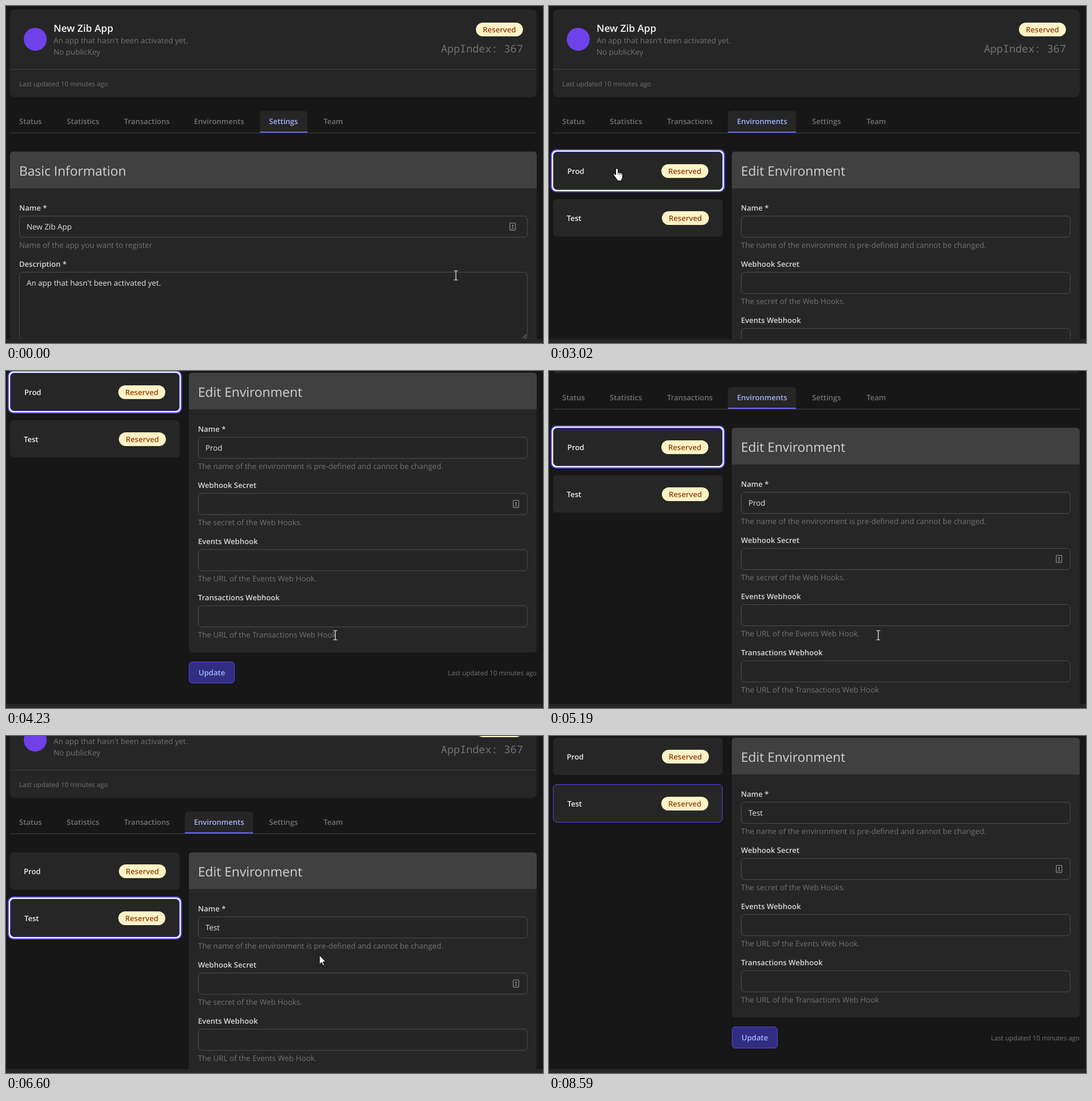
Recreate the animation shown at these times as an HTML page. Size 937x588 px, loop 8.69 s.

```html
<!DOCTYPE html>
<html lang="en">
<head>
<meta charset="utf-8">
<title>App environments</title>
<style>
  html, body { margin: 0; width: 100%; height: 100%; overflow: hidden; background: #171717; }
  svg { display: block; width: 937px; height: 588px; }
  text { font: 13.37px "Open Sans", "Noto Sans", sans-serif; fill: #737373; white-space: pre; text-rendering: geometricPrecision; }
  .semi { font-size: 13.05px; font-weight: 600; }
  .small { font-size: 11.46px; }
  .name { font-size: 17.2px; font-weight: 600; fill: #f5f5f5; }
  .title { font-size: 22.7px; fill: #d4d4d4; }
  .label { fill: #d9d9d9; }
  .value { fill: #e5e5e5; }
  .bright { fill: #f0f0f0; }
  .mono { font: 18.33px "Noto Sans Mono", "DejaVu Sans Mono", monospace; }
  .badge { fill: #92400e; text-anchor: middle; }
  .indigo { fill: #a5b4fc; }
  .end { text-anchor: end; }
</style>
</head>
<body>
<svg id="stage" viewBox="0 0 937 588"></svg>
<script>
const LOOP = 8690;
const stage = document.getElementById('stage');

// Tracks: [start time, value...]
const SCROLL = [
  [0, 0], [3680, 90], [3810, 224], [3960, 251],
  [5040, 175], [5190, 155], [5310, 58], [5460, 53], [5580, 51],
  [6750, 154], [6870, 251]
];
const POINTER = [
  [0, 785, 470, 'beam'], [620, 765, 440, 'arrow'], [740, 650, 350, 'arrow'], [860, 561, 288, 'arrow'],
  [1010, 500, 262, 'arrow'], [1130, 425, 225, 'arrow'], [1250, 378, 200, 'hand'], [1400, 376.5, 199.5, 'hand'],
  [2200, 368, 248, 'arrow'], [2350, 272, 286, 'hand'], [2500, 160, 291, 'hand'], [2650, 118.500, 283.500, 'hand'],
  [3140, 270, 312, 'hand'], [3260, 424, 344, 'arrow'], [3410, 520, 420, 'arrow'], [3530, 572, 460, 'arrow'],
  [4230, 574.5, 461, 'beam'], [5310, 480, 411, 'beam'], [5460, 384.5, 363, 'beam'],
  [5580, 310, 346, 'arrow'], [5700, 210, 330, 'hand'], [5820, 135, 318, 'hand'], [5940, 105, 313, 'hand'],
  [6240, 160, 319, 'hand'], [6360, 320, 347, 'arrow'], [6480, 460, 370, 'arrow'], [6600, 546.5, 382, 'arrow'],
  [7860, 640, 425, 'beam'], [7980, 726, 455, 'arrow'], [8100, 822, 472, 'arrow'], [8220, 921, 569, 'arrow'],
  [8340, 0, 0, 'none']
];
const STEPS = [...new Set([...SCROLL, ...POINTER].map(k => k[0])
  .concat(1800, 2900, 6090, 4100, 8590))].sort((a, b) => a - b);

const TABS = [
  ['Status', 23, 55], ['Statistics', 106, 72], ['Transactions', 206, 95],
  ['Environments', 328, 103], ['Settings', 459, 67], ['Team', 554, 50]
];
const FIELDS = [
  ['Name *', 'The name of the environment is pre-defined and cannot be changed.'],
  ['Webhook Secret', 'The secret of the Web Hooks.'],
  ['Events Webhook', 'The URL of the Events Web Hook.'],
  ['Transactions Webhook', 'The URL of the Transactions Web Hook']
];
const APP = 'New Zib App';
const ABOUT = "An app that hasn't been activated yet.";
const UPDATED = 'Last updated 10 minutes ago';

const CURSORS = {
  none: '',
  arrow: `<path d="M.5 .5V16.500L4.200 13 6.600 18.500 9 17.400 6.600 12H11.500Z" fill="#fff" stroke="#000"/>`,
  beam: `<path d="M-3.500-8H-.8L0-7.300 .8-8H3.500M0-7.500V7.500M-3.500 8H-.8L0 7.300 .8 8H3.500" fill="none" stroke="#eee" stroke-width="1.200"/>`,
  hand: `<path d="M-2 2a2 2 0 0 1 4 0v5.500q1.800-1.200 3 .4 1.800-.9 2.800 .6 2.200-.4 2.200 1.800v4.200q0 2.500-1.800 4.500v2.500h-7.700v-1.700q-2-2-3.600-5-1.700-2.300-2.800-3.600c-.7-1.600 1-2.600 2.200-1.600l1.700 1.600z" fill="#fff" stroke="#000"/>
    <path d="M2 8v3M5 8.500v3M8 9.500v2.500" stroke="#000" stroke-width=".8"/>`
};

const at = (track, t) => track.filter(k => k[0] <= t).pop();
const text = (x, y, s, cls = '') => `<text x="${x}" y="${y}" class="${cls}">${s}</text>`;
const box = (x, y, w, h, fill, r = 0, extra = '') =>
  `<rect x="${x}" y="${y}" width="${w}" height="${h}" rx="${r}" fill="${fill}" ${extra}/>`;
const framed = (x, y, w, h, fill, stroke, r = 5.5) =>
  box(x + .5, y + .5, w - 1, h - 1, fill, r, `stroke="${stroke}"`);
const topRound = (x, y, w, h, r, fill) =>
  `<path d="M${x} ${y + h}v${r - h}q0 ${-r} ${r} ${-r}h${w - 2 * r}q${r} 0 ${r} ${r}v${h - r}z" fill="${fill}"/>`;
const badge = (right, y) =>
  box(right - 82, y, 82, 24, '#fef3c7', 12) + text(right - 41, y + 17, 'Reserved', 'semi badge');
const fillIcon = (x, y) =>
  `<g transform="translate(${x} ${y})"><rect x="-4.800" y="-6.300" width="9.600" height="12.600" rx="1" fill="none" stroke="#858585" stroke-width="1.300"/>
   <circle cy="-2" r="1.200" fill="#a3a3a3"/><path d="M-1 0H1V2H-1ZM-2.500 3H2.500V4H-2.500Z" fill="#858585"/></g>`;

function header(right) {
  return box(7, 6, right - 7, 153, '#262626', 8) +
    box(7, 110, right - 7, 1, '#404040') +
    '<circle cx="51" cy="58" r="20" fill="#6f41e8"/>' +
    text(83, 45, APP, 'name') + text(83, 65, ABOUT) + text(83, 85, 'No publicKey') +
    badge(right - 24, 29) + text(right - 24, 81, 'AppIndex: 367', 'mono end') +
    text(23, 140, UPDATED, 'small');
}

function tabs(right, active, hover) {
  return box(7, 221, right - 7, 1, '#404040') + TABS.map(([name, x, w]) => {
    const on = name === active, lit = on || name === hover;
    const back = lit ? topRound(x - 16, 183, w + 16, 38, 6, '#262626') +
      box(x - 16, 219, w + 16, 2, on ? '#6366f1' : '#737373') : '';
    const fill = on ? '#a5b4fc' : lit ? '#a3a3a3' : '#737373';
    return back + `<g>${text(x, 206, name, 'semi').replace('<text', `<text style="fill:${fill}"`)}</g>`;
  }).join('');
}

function panel(x, bottom, title) {
  return box(x, 254, 926 - x, bottom - 254, '#262626', 6) +
    topRound(x, 254, 926 - x, 64, 6, '#404040') + text(x + 16, 296, title, 'title');
}

function field(x, y, label, value, hint, h = 38) {
  return text(x, y, label, 'semi label') +
    framed(x, y + 9, 910 - x, h, '#252525', '#4b4b4b') +
    text(x + 13, y + 33, value, 'value') + text(x, y + 65, hint);
}

function settings() {
  return panel(7, 640, 'Basic Information') +
    field(23, 357, 'Name *', APP, 'Name of the app you want to register') + fillIcon(884, 385) +
    field(23, 455, 'Description *', ABOUT, '', 118) +
    '<path d="M901 580l7-7M905 580l3-3" stroke="#a3a3a3"/>';
}

function tile(y, name, right, selected, focused) {
  const h = selected ? 67 : 65, d = selected ? 1 : 0, w = right - 7;
  const ring = focused ? box(3, y - 4, w + 8, h + 8, '#5b54ee', 10) +
    box(5, y - 2, w + 4, h + 4, '#fff', 8) : '';
  const body = selected ? framed(7, y, w, h, '#262626', '#4f46e5', 6.5) : box(7, y, w, h, '#262626', 6);
  return ring + body + text(31 + d, y + 38 + d, name, 'semi bright') + badge(right - 24 - d, y + 21 + d);
}

function environments(t) {
  const chosen = t < 2900 ? '' : t < 6090 ? 'Prod' : 'Test';
  const focus = t < 2900 || t >= 8590 ? '' : t < 5940 ? 'Prod' : 'Test';
  const right = chosen ? 303 : 308;
  const tiles = tile(254, 'Prod', right, chosen === 'Prod', focus === 'Prod') +
    tile(chosen === 'Prod' ? 337 : 335, 'Test', right, chosen === 'Test', focus === 'Test');
  if (!chosen) return tiles;
  const value = t < 3140 ? '' : t < 6240 ? 'Prod' : 'Test';
  return tiles + panel(319, 742, 'Edit Environment') +
    FIELDS.map(([label, hint], i) => field(335, 357 + 98 * i, label, i ? '' : value, hint)).join('') +
    (t >= 4100 ? fillIcon(890, 483) : '') +
    framed(319, 758, 80, 38, '#312e81', '#4f46e5') + text(336, 782, 'Update', 'semi indigo') +
    text(926, 782, UPDATED, 'small end');
}

function scene(t) {
  const right = t >= 1800 && t < 2900 ? 943 : 926;
  const active = t < 1800 ? 'Settings' : t < 2350 ? '' : 'Environments';
  const hover = t >= 1250 && t < 2350 ? 'Environments' : '';
  const [, x, y, kind] = at(POINTER, t);
  return box(0, 0, 937, 588, '#171717') +
    `<g transform="translate(0 ${-at(SCROLL, t)[1]})">` +
    header(right) + tabs(right, active, hover) + (t < 1800 ? settings() : environments(t)) + '</g>' +
    box(0, 581, 937, 7, '#262626') +
    `<g transform="translate(${x} ${y})">${CURSORS[kind]}</g>`;
}

let shown = -1;
function draw(now) {
  const step = STEPS.filter(s => s <= now % LOOP).pop();
  if (step !== shown) stage.innerHTML = scene(shown = step);
  requestAnimationFrame(ms => draw(Math.max(0, ms - start)));
}
const start = performance.now();
draw(0);
</script>
</body>
</html>
```
